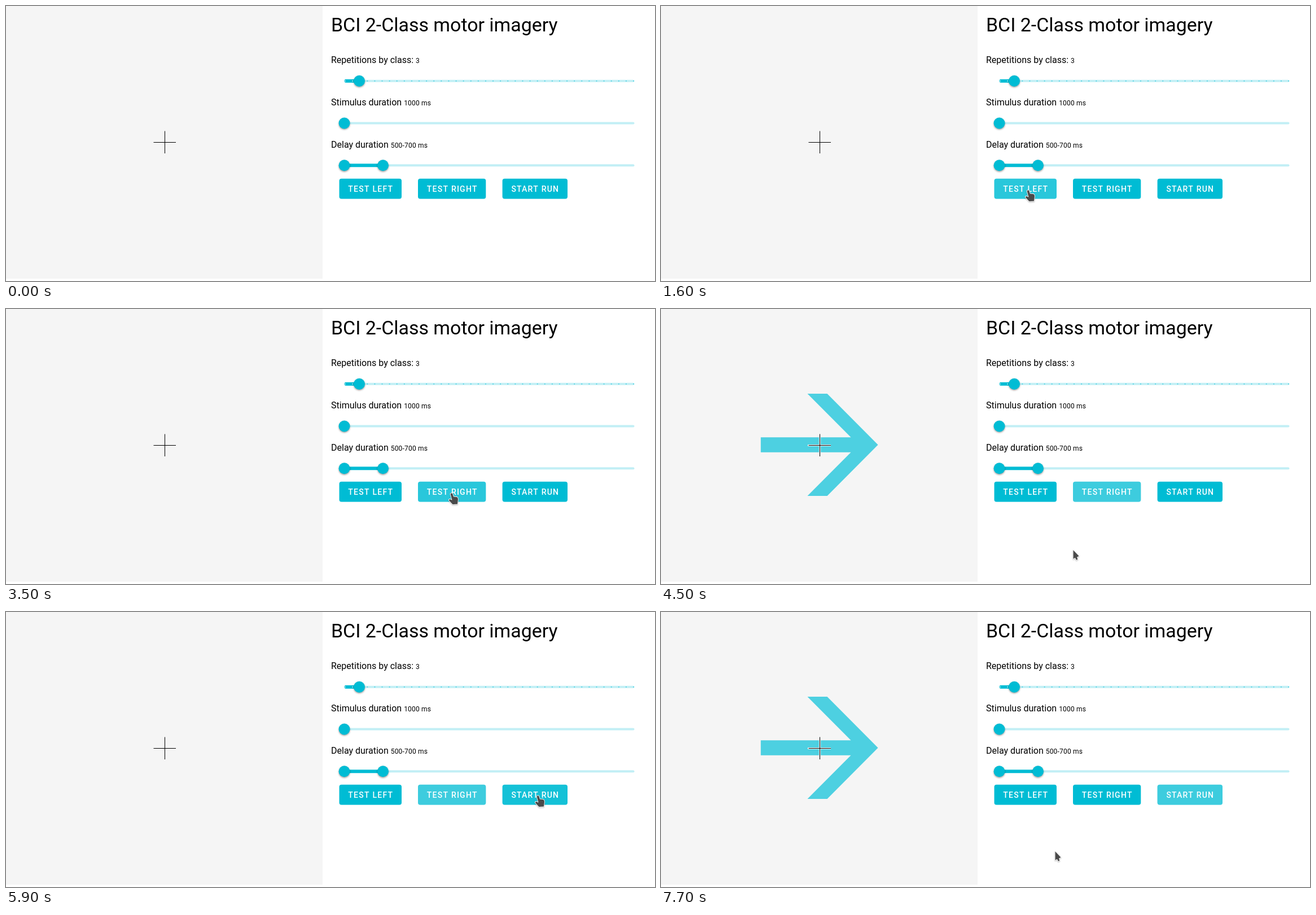
An HTML page with a canvas for the animation above (8 s loop, 1150 px wide and 487 px high).

```html
<!DOCTYPE html>
<html lang="en">
<head>
<meta charset="utf-8">
<title>Motor imagery</title>
<style>
  html, body { margin: 0; width: 100%; height: 100%; overflow: hidden; background: #fff; }
  canvas { display: block; }
</style>
</head>
<body>
<canvas id="stage" width="1150" height="487"></canvas>
<script>
const ctx = document.getElementById('stage').getContext('2d');
const LOOP = 8000, STEP = 100, STIMULUS = 1000;
const PRIMARY = '#00bcd4', TRACK = '#c2eff5', PANEL = '#f5f5f5';
const TRACK_LEFT = 599.5, TRACK_RIGHT = 1113.5;
const BUTTON_TOP = 305.8, BUTTON_HEIGHT = 35.7;
const ROW_HEIGHT = 74.8;
const POINTER_SHOWN = 400;

const point = (x, y) => ({ x, y });
const mix = (a, b, k) => point(a.x + (b.x - a.x) * k, a.y + (b.y - a.y) * k);
const smooth = k => k * k * (3 - 2 * k);
const easeOut = k => 1 - (1 - k) ** 2;
const hesitate = k => 0.5 + 0.5 * (2 * k - 1) ** 3;   // pauses half way

// The pointer departs, arrives at the spot, presses, leaves along a bend and settles.
const home = point(660, 412);
const buttons = [
  { label: 'TEST LEFT', x: 590.5, w: 110.5, side: 'left', shown: [1800],
    depart: 700, arrive: 1600, press: 1600, leave: 1700, settle: 2500, pace: hesitate,
    spot: point(650, 326), bend: point(669, 559), park: point(748, 418) },
  { label: 'TEST RIGHT', x: 730, w: 120.3, side: 'right', shown: [3600],
    depart: 2700, arrive: 3500, press: 3500, leave: 3600, settle: 3800, pace: hesitate,
    spot: point(789, 326), bend: point(760, 376), park: point(730, 426) },
  { label: 'START RUN', x: 879.6, w: 115.4, side: 'right', shown: [6000, 7700],
    depart: 4800, arrive: 5900, press: 6000, leave: 6000, settle: 6700, pace: easeOut,
    spot: point(942, 325), bend: point(1250, 510), park: point(698, 423) }
];

function pointerAt(t) {
  let rest = home;
  for (const b of buttons) {
    if (t < b.depart) return rest;
    if (t < b.arrive) {
      return mix(rest, b.spot, b.pace((t - b.depart) / (b.arrive - b.depart)));
    }
    if (t <= b.leave) return b.spot;
    if (t < b.settle) {
      const k = smooth((t - b.leave) / (b.settle - b.leave));
      return mix(mix(b.spot, b.bend, k), mix(b.bend, b.park, k), k);
    }
    rest = b.park;
  }
  return rest;
}

function isOver(button, p) {
  return p.x >= button.x && p.x < button.x + button.w &&
    p.y >= BUTTON_TOP && p.y < BUTTON_TOP + BUTTON_HEIGHT;
}

function text(str, x, y, font, color = '#000', spacing = 0) {
  ctx.font = font + ' Roboto, sans-serif';
  ctx.letterSpacing = spacing + 'px';
  ctx.fillStyle = color;
  ctx.fillText(str, x, y);
  return x + ctx.measureText(str).width;
}

function bar(x, y, w, h, r, color) {
  ctx.fillStyle = color;
  ctx.beginPath();
  ctx.roundRect(x, y, w, h, r);
  ctx.fill();
}

function dot(x, y, r, color) {
  ctx.fillStyle = color;
  ctx.beginPath();
  ctx.arc(x, y, r, 0, Math.PI * 2);
  ctx.fill();
}

function polygon(points) {
  ctx.beginPath();
  points.forEach(([x, y]) => ctx.lineTo(x, y));
  ctx.closePath();
}

function withShadow(alpha, blur, dy, draw) {
  ctx.save();
  ctx.shadowColor = `rgba(0,0,0,${alpha})`;
  ctx.shadowBlur = blur;
  ctx.shadowOffsetY = dy;
  draw();
  ctx.restore();
}

function slider(y, from, to, steps) {
  bar(TRACK_LEFT, y - 2, TRACK_RIGHT - TRACK_LEFT, 4, 2, TRACK);
  if (to > from) bar(from, y - 3, to - from, 6, 3, PRIMARY);
  for (let i = 0; i < steps; i++) {
    const x = TRACK_LEFT + 1.5 + i * (TRACK_RIGHT - TRACK_LEFT - 3) / (steps - 1);
    dot(x, y, 1, x < to ? 'rgba(255,255,255,.75)' : 'rgba(0,188,212,.6)');
  }
  const thumbs = steps ? [to] : [from, to];
  for (const x of new Set(thumbs)) {
    withShadow(0.38, 3, 1.5, () => dot(x, y, 10, PRIMARY));
  }
}

function settingRow(index, name, value, from, to, steps = 0) {
  const y = index * ROW_HEIGHT, baseline = Math.round(101 + y);
  const end = text(name + ' ', 576, baseline, '400 16px');
  text(value, end, baseline, '400 12px', '#000', 0.2);
  slider(132.7 + y, from, to, steps);
}

function drawButton(button, index, t, pointer) {
  const next = buttons[index + 1];
  const focused = t >= button.press && !(next && t >= next.press);
  const hover = pointer && isOver(button, pointer);
  const tint = focused ? (hover ? 0.16 : 0.24) : (hover ? 0.08 : 0);
  bar(button.x, BUTTON_TOP, button.w, BUTTON_HEIGHT, 4, PRIMARY);
  bar(button.x, BUTTON_TOP, button.w, BUTTON_HEIGHT, 4, `rgba(255,255,255,${tint})`);
  text(button.label, button.x + 15.8, 329, '500 14px', '#fff', 1.25);
}

function drawArrow(side) {
  const top = [[177, 240.5], [267, 150], [302, 150], [225, 227.3], [384.7, 227.3]];
  const bottom = top.map(([x, y]) => [x, 481 - y]).reverse();
  const left = [...top, ...bottom];
  polygon(side === 'left' ? left : left.map(([x, y]) => [561.5 - x, y]));
  ctx.fillStyle = '#4dd0e1';
  ctx.fill();
}

function drawCross() {
  ctx.fillStyle = PANEL;
  ctx.fillRect(260, 240, 41, 3);
  ctx.fillRect(280, 221, 3, 40);
  ctx.fillStyle = '#000';
  ctx.fillRect(261.5, 241, 39.5, 1);
  ctx.fillRect(281, 221.5, 1, 39.5);
}

function handShape() {
  ctx.beginPath();
  ctx.moveTo(-1.5, 1.5);
  ctx.quadraticCurveTo(0, -0.5, 2, 0.5);
  ctx.lineTo(4, 6.5);
  ctx.lineTo(10, 7);
  ctx.quadraticCurveTo(12, 8, 12, 11);
  ctx.lineTo(11, 19.5);
  ctx.lineTo(2.5, 20);
  ctx.lineTo(-4, 13);
  ctx.quadraticCurveTo(-4.5, 10.5, -2, 11);
  ctx.lineTo(1.5, 12.5);
  ctx.closePath();
}

function arrowShape() {
  polygon([[0.5, 1], [0.5, 16.5], [3.8, 14.5], [6, 18.5], [8.4, 17.2], [7, 13.5], [10.5, 11.5]]);
}

function drawPointer(p) {
  ctx.save();
  ctx.translate(Math.round(p.x), Math.round(p.y));
  if (buttons.some(b => isOver(b, p))) handShape();
  else arrowShape();
  ctx.lineJoin = 'round';
  ctx.lineWidth = 1.8;
  ctx.strokeStyle = '#fff';
  withShadow(0.3, 2, 1, () => ctx.stroke());
  ctx.fillStyle = '#4a4a4a';
  ctx.fill();
  ctx.restore();
}

function render(time) {
  const t = Math.floor((time % LOOP) / STEP) * STEP;
  const pointer = t >= POINTER_SHOWN ? pointerAt(t) : null;

  ctx.fillStyle = '#fff';
  ctx.fillRect(0, 0, 1150, 487);
  ctx.fillStyle = PANEL;
  ctx.fillRect(0, 0, 561, 483);

  const active = buttons.find(b => b.shown.some(from => t >= from && t < from + STIMULUS));
  if (active) drawArrow(active.side);
  drawCross();

  text('BCI 2-Class motor imagery', 576, 45, '400 33.9px');
  settingRow(0, 'Repetitions by class:', '3', TRACK_LEFT, 626, 40);
  settingRow(1, 'Stimulus duration', '1000 ms', TRACK_LEFT, TRACK_LEFT);
  settingRow(2, 'Delay duration', '500-700 ms', TRACK_LEFT, 668);

  buttons.forEach((b, i) => drawButton(b, i, t, pointer));
  if (pointer) drawPointer(pointer);
}

const start = performance.now();
function tick() {
  render(performance.now() - start);
  requestAnimationFrame(tick);
}
tick();
</script>
</body>
</html>
```
